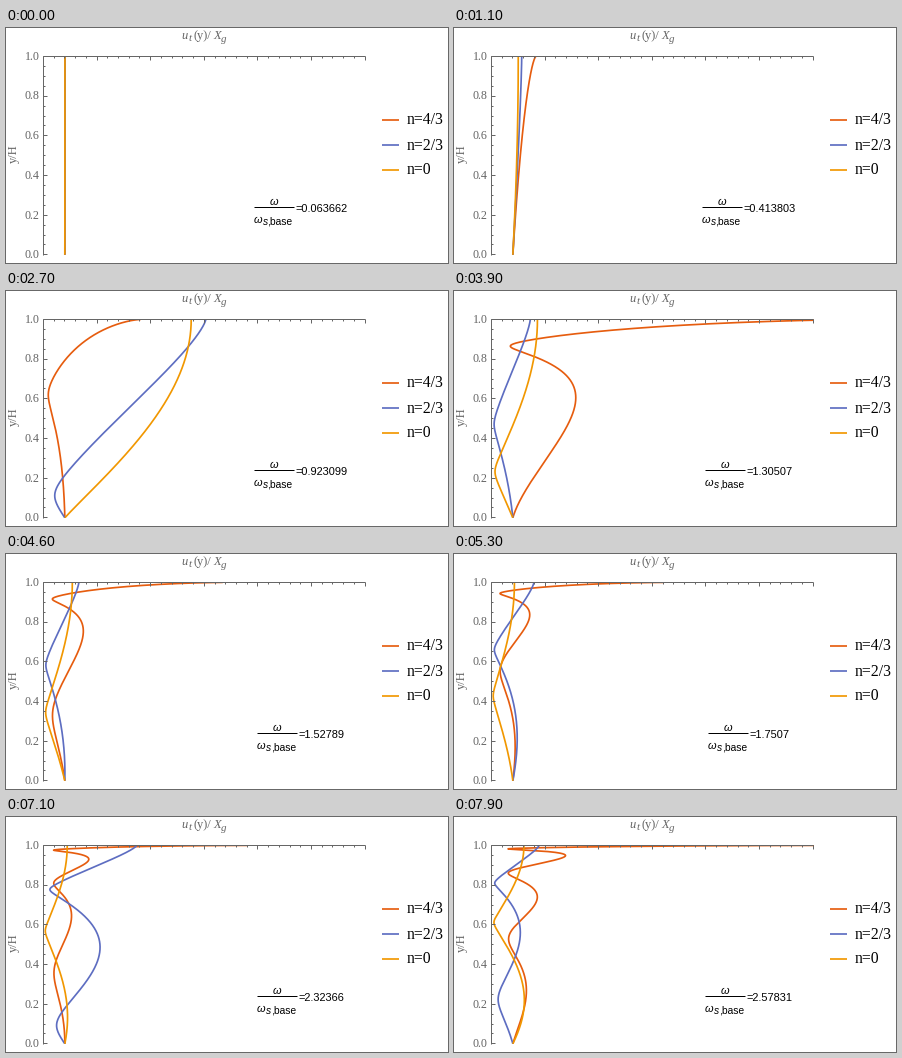
These frames come from a looping animation (442 px wide and 235 px high, 8000 ms). A matplotlib script:

```python
import numpy as np
import matplotlib.pyplot as plt
from matplotlib.animation import FuncAnimation
from matplotlib.patches import Rectangle

W, H, DPI = 442, 235, 100
PX = 72 / DPI
LEFT, RIGHT, TOP, BOTTOM = 37.4, 359, 28.4, 226.8
FRAME_X, FRAME_Y = 37, 28
X_MAX = 15
FRAMES, STEP_MS = 80, 100
DAMPING = 0.05
GRAY = "#666666"
SERIF, SANS = "Liberation Serif", "Liberation Sans"
PROFILES = [
    (4 / 3, "n=4/3", (0.9, 0.36, 0.054)),
    (2 / 3, "n=2/3", (0.365, 0.428, 0.758)),
    (0, "n=0", (0.945, 0.594, 0.0)),
]

fig = plt.figure(figsize=(W / DPI, H / DPI), dpi=DPI, facecolor="white")
ax = fig.add_axes([0, 0, 1, 1])
ax.set_xlim(0, W)
ax.set_ylim(H, 0)
ax.axis("off")


def text(x, y, s, size, font=SERIF, color=GRAY, **kw):
    kw.setdefault("va", "baseline")
    return ax.text(x, y, s, fontsize=size * PX, family=font, color=color, **kw)


def stroke(xs, ys, color=GRAY, width=1.0, **kw):
    return ax.plot(xs, ys, color=color, lw=width * PX, **kw)[0]


def to_x(u):
    return LEFT + u / X_MAX * (RIGHT - LEFT)


def to_y(h):
    return BOTTOM - h * (BOTTOM - TOP)


def frame_line(xs, ys):
    stroke(xs, ys, zorder=5, solid_capstyle="butt")


def draw_axes():
    frame_line([FRAME_X, FRAME_X], [FRAME_Y, BOTTOM])
    frame_line([FRAME_X, RIGHT], [FRAME_Y, FRAME_Y])
    for i in range(21):
        y = to_y(i / 20) - 0.4
        frame_line([FRAME_X, FRAME_X + (4 if i % 4 == 0 else 2)], [y, y])
        if i % 4 == 0:
            text(33.8, y + 3.8, f"{i / 20:.1f}", 12, ha="right")
    for i in range(31):
        x = to_x(i / 2) - 0.4
        frame_line([x, x], [FRAME_Y, FRAME_Y + (4 if i % 5 == 0 else 2)])


def draw_labels():
    text(175.8, 11, "u", 12.5, style="italic")
    text(182.3, 13, "t", 11, style="italic")
    text(187.3, 11, "(y)/", 12.5)
    text(207, 11, "X", 12.5, style="italic")
    text(214.8, 13.5, "g", 11, style="italic")
    text(7.8, 125.5, "y/H", 12.5, rotation=90, ha="center", va="center")
    for i, (_, name, color) in enumerate(PROFILES):
        y = 92 + 25 * i
        stroke([375.5, 392.7], [y, y], color, 1.7, solid_capstyle="butt")
        text(401, y + 4.5, name, 15.8, color="black")


def mode(n, theta, z):
    """Regular solution of (z^n u')' + k^2 u = 0 as a power series."""
    k2 = theta**2 / (1 + 2j * DAMPING)
    c = 1 / (2 - n)
    w = -k2 * c**2 * z ** (2 - n)
    term = np.ones_like(w)
    total = term.copy()
    for m in range(50):
        term = term * w / ((m + 1) * (c + m))
        total += term
    return total


draw_axes()
draw_labels()

depth = np.linspace(0, 1, 700) ** 3
window = Rectangle((LEFT, TOP - 0.8), RIGHT - LEFT + 0.5, BOTTOM - TOP + 0.8,
                   transform=ax.transData)
curves = []
for _, _, color in PROFILES:
    curve = stroke([], [], color, 1.7, zorder=3, solid_capstyle="butt")
    curve.set_clip_path(window)
    curves.append(curve)

# Each piece of the ratio label with its offset from the left end.
INK = dict(font=SANS, color="black")
pieces = [
    (15.5, text(0, 177.3, "ω", 11, style="italic", **INK)),
    (-0.3, text(0, 195, "ω", 11, style="italic", **INK)),
    (8.6, text(0, 197, "s", 10.2, style="italic", **INK)),
    (13.5, text(0, 197, ",base", 10.2, **INK)),
]
value = text(0, 184.5, "", 11, **INK)
bar = stroke([], [], "black", 1.0, solid_capstyle="butt")


def update(i):
    omega = 0.2 + 0.1 * i
    for (n, _, _), curve in zip(PROFILES, curves):
        u = mode(n, omega / 2, depth)
        curve.set_data(to_x(np.abs(u / u[-1])), to_y(1 - depth))
    ratio = f"{omega / np.pi:.6g}"
    x = 248 + 3.06 * (8 - len(ratio))
    for dx, piece in pieces:
        piece.set_x(x + dx)
    bar.set_data([x, x + 40], [179, 179])
    value.set_x(x + 41.2)
    value.set_text("=" + ratio)
    return [*curves, bar, value, *(p for _, p in pieces)]


anim = FuncAnimation(fig, update, frames=FRAMES, interval=STEP_MS,
                     repeat=True, repeat_delay=0)
plt.show()
```
